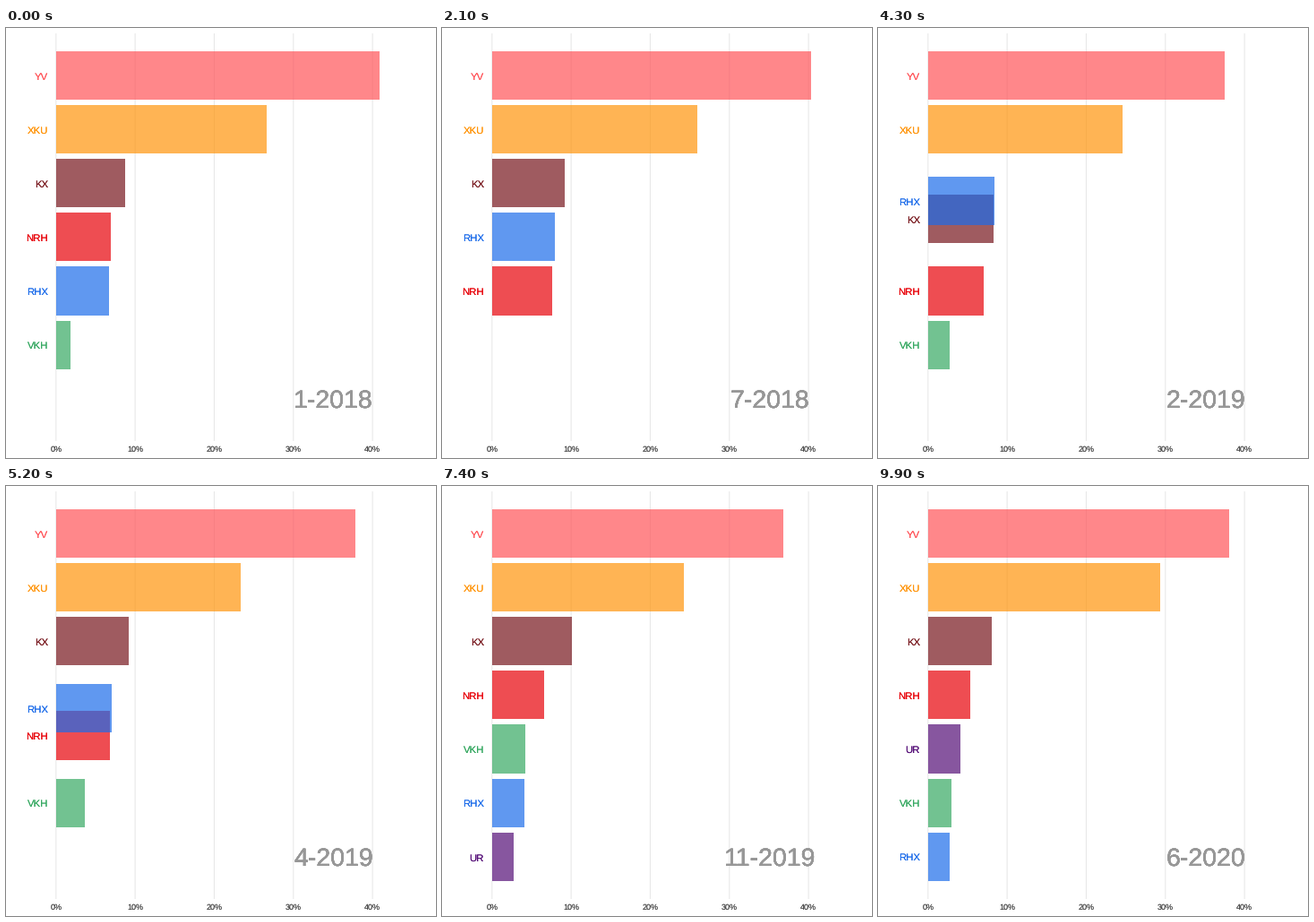
Recreate the animation shown at these times as a matplotlib script. Size 480x480 px, loop 10000 ms.

```python
import numpy as np
import matplotlib.pyplot as plt
from matplotlib.animation import FuncAnimation
from matplotlib.patches import Rectangle

plt.rcParams["font.family"] = "Liberation Sans"
plt.rcParams["text.hinting"] = "none"

SIZE, DPI = 480, 72
FRAMES, INTERVAL = 100, 100
MONTHS = 30
X0, PER_PCT = 55.8, 8.833          # zero line and pixels per percent
TOP, SLOT, BAR_H = 52.98, 60.13, 54.12
ALWAYS = [(0, MONTHS - 1)]

# name, colour, months on the chart, turning points {month: percent}
PARTIES = [
    ("YV", "#ff5459", ALWAYS,
     {0: 40.9, 4: 38.95, 5: 40.9, 9: 38.9, 13: 37.4, 18: 38.35, 19: 43.6,
      20: 37.9, 25: 34.7, 29: 38.1}),
    ("XKU", "#ff950b", ALWAYS,
     {0: 26.65, 4: 27.55, 9: 24, 13: 24.7, 18: 21.7, 25: 26.5, 29: 29.35}),
    ("KX", "#77161c", ALWAYS,
     {0: 8.75, 4: 9.25, 9: 9.1, 12: 8.5, 13: 8.2, 18: 10.5, 25: 9.7, 29: 8.05}),
    ("NRH", "#e80209", ALWAYS,
     {0: 6.93, 4: 7.7, 9: 7.4, 18: 6.6, 25: 6.5, 29: 5.35}),
    ("RHX", "#1c6cea", ALWAYS,
     {0: 6.7, 4: 6.95, 9: 9.2, 12: 8.2, 13: 8.5, 18: 5.2, 25: 3, 29: 2.75}),
    ("VKH", "#36a962", [(0, 1), (11, 29)],
     {0: 1.83, 13: 2.8, 18: 4.6, 25: 3.95, 29: 2.97}),
    ("UR", "#540e77", [(13, 14), (17, 29)],
     {13: 0.6, 18: 0.7, 25: 4.55, 26: 6.3, 29: 4.1}),
]

months = np.arange(MONTHS)
keys = np.round(months * (FRAMES - 1) / (MONTHS - 1)).astype(int)
pct = np.array([np.interp(months, list(points), list(points.values()))
                for *_, points in PARTIES])
shown = np.array([[any(a <= m <= b for a, b in spans) for m in months]
                  for _, _, spans, _ in PARTIES])
rank = (-np.where(shown, pct, -1)).argsort(axis=0).argsort(axis=0)

fig = plt.figure(figsize=(SIZE / DPI, SIZE / DPI), dpi=DPI, facecolor="white")
ax = fig.add_axes([0, 0, 1, 1])
ax.set_xlim(0, SIZE)
ax.set_ylim(SIZE, 0)
ax.axis("off")


def heavy_text(x, y, text, size, color, ha, layers):
    """Stack copies of a text so that its edges look crisp and heavy."""
    return [ax.text(x, y, text, size=size, color=color, ha=ha, va="baseline",
                    zorder=10) for _ in range(layers)]


for tick in range(0, 50, 10):
    x = X0 + tick * PER_PCT
    ax.plot([x, x], [6, 461], color="#e8e8e8", lw=1.07, snap=False,
            solid_capstyle="butt", zorder=1)
    heavy_text(x, 473, f"{tick}%", 9, "#4d4d4d", "center", 2)

bars, labels = [], []
for i, (name, color, *_) in enumerate(PARTIES):
    bars.append(ax.add_patch(Rectangle((X0, 0), 1, BAR_H, fc=color, ec="none",
                                       lw=0, alpha=0.7, zorder=2 + i)))
    labels.append(heavy_text(47, 0, name, 11.38, color, "right", 2))
dates = heavy_text(X0 + 35 * PER_PCT + 0.7, 424.2, "", 28.45, "#979797",
                   "center", 6)


def draw(frame):
    a = int(np.searchsorted(keys, frame, side="right")) - 1
    b = min(a + 1, MONTHS - 1)
    t = (frame - keys[a]) / max(keys[b] - keys[a], 1)
    width = PER_PCT * (pct[:, a] * (1 - t) + pct[:, b] * t)
    mid = TOP + SLOT * (rank[:, a] * (1 - t) + rank[:, b] * t)
    on = shown[:, a] & (shown[:, b] | (t == 0))

    for i, bar in enumerate(bars):
        bar.set(visible=bool(on[i]), y=mid[i] - BAR_H / 2, width=width[i])
        for label in labels[i]:
            label.set(visible=bool(on[i]), y=mid[i] + 4.7)

    m = round(frame * (MONTHS - 1) / (FRAMES - 1))
    for date in dates:
        date.set_text(f"{m % 12 + 1}-{2018 + m // 12}")
    return bars + sum(labels, []) + dates


anim = FuncAnimation(fig, draw, frames=FRAMES, interval=INTERVAL,
                     repeat=True, repeat_delay=0, blit=False)
plt.show()
```
